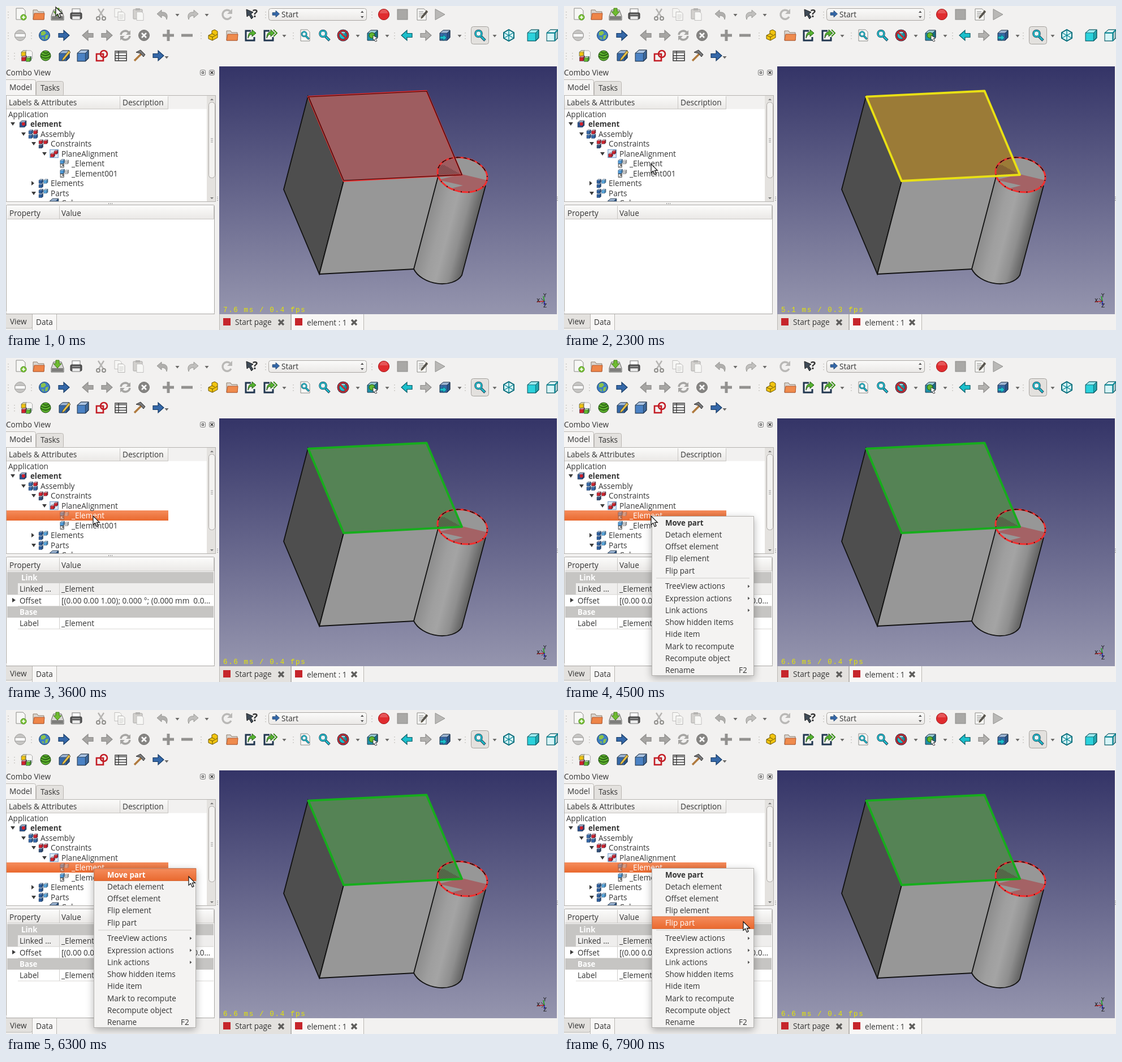
An HTML page that plays this animation: 976 by 574 pixels, repeating every 8000 ms.

```html
<!DOCTYPE html>
<html lang="en">
<head>
<meta charset="utf-8">
<title>Assembly element menu</title>
<style>
html, body { margin: 0; width: 100%; height: 100%; overflow: hidden; background: #f2f1f0; }
svg { display: block; }
text { font: 13.6px "Open Sans", "Noto Sans", sans-serif; fill: #343434; white-space: pre; }
.b { font-weight: 700; font-size: 13.3px; }
.w { fill: #fff; }
.fps { font: 12.5px "Liberation Mono", monospace; letter-spacing: 1.65px; fill: #e6e600; }
.axis { font: 9px "DejaVu Sans", sans-serif; fill: #111; }
#menu { filter: drop-shadow(0 4px 7px rgba(0, 0, 0, .3)); }
</style>
</head>
<body>
<svg id="stage" width="976" height="574" viewBox="0 0 976 574"></svg>
<script>
const TEAL = '#1cbfcb', BLUE = '#3568a8', DARK = '#20364f', GREY = '#a6a5a3', RED = '#d2222c';

// Shape helpers, each returning markup
const path = (d, fill = 'none', stroke = 'none', w = 1, more = '') =>
  `<path d="${d}" fill="${fill}" stroke="${stroke}" stroke-width="${w}" ${more}/>`;
const rect = (x, y, w, h, fill, stroke = 'none', rx = 0, more = '') =>
  `<rect x="${x}" y="${y}" width="${w}" height="${h}" rx="${rx}" fill="${fill}" stroke="${stroke}" ${more}/>`;
const disc = (x, y, r, fill, stroke = 'none', w = 1) =>
  `<circle cx="${x}" cy="${y}" r="${r}" fill="${fill}" stroke="${stroke}" stroke-width="${w}"/>`;
const text = (x, y, s, cls = '', more = '') => `<text x="${x}" y="${y}" class="${cls}" ${more}>${s}</text>`;
const group = (id, body, more = '') => `<g id="${id}" ${more}>${body}</g>`;
const at = (x, y, body, s = 1) => `<g transform="translate(${x} ${y}) scale(${s})">${body}</g>`;
const grad = (id, stops, coords = 'x1="0" y1="0" x2="0" y2="1"') =>
  `<linearGradient id="${id}" ${coords}>` +
  stops.map(([o, c]) => `<stop offset="${o}" stop-color="${c}"/>`).join('') + '</linearGradient>';
const line = (x1, y1, x2, y2, c = '#c3c1be', w = 1) => path(`M${x1} ${y1}L${x2} ${y2}`, 'none', c, w);

// Icons centred on 0,0
const cube = (c, edge = DARK) =>
  path('M-9-4L-3-9H9V4L4 9H-9Z', c, edge) + path('M-9-4L-3-9H9L4-4Z', '#fff8', edge, .7) +
  path('M4-4L9-9V4L4 9Z', '#0003', edge, .7);
const arrow = (c, edge, flip) =>
  path('M-9-3.5H0V-9L10 0 0 9V3.5H-9Z', c, edge, 1.2, flip ? 'transform="scale(-1 1)"' : '');
const drop = (x, y) => path(`M${x - 3.5} ${y - 2}h7l-3.5 4.5z`, '#6b6a68');
const grip = (x, y) => [-5, 0, 5].map(d => rect(x - 1, y + d, 2, 1.4, '#c9c7c4')).join('');
const sheet = (edge = '#8b8b88') => path('M-8-10H4L8-6V10H-8Z', '#f7f7f5', edge);
const folder = (c, edge) => path('M-10 9V-8H-3L-1-5H9V9Z', '#d8d5d0', '#8f7c6b') + path('M-10 9L-8-2H10L9 9Z', c, edge);
const lens = c => path('M2 2L9 9', 'none', DARK, 4.6) + path('M2 2L8.5 8.5', 'none', c, 3) +
  disc(-2.5, -3, 5.5, '#e4f8fa', DARK, 3.6) + disc(-2.5, -3, 5.5, 'none', c, 2.2);
const spin = c => path('M-8-1A8 8 0 0 1 6-5M8 1A8 8 0 0 1-6 5', 'none', c, 3.5) +
  path('M9-9V-1H1ZM-9 9V1H-1Z', c);
const curl = (c, flip) => path('M-10-1L-2-8V-4C7-5 10 1 7 9 6 4 3 2-2 2V6Z', c, '#8f8e8b', .8,
  flip ? 'transform="scale(-1 1)"' : '');
const linkBox = path('M1-8H-8V9H7V3', 'none', DARK, 3) + path('M-4 5C-4-3-1-6 3-6V-10L10-4 3 2V-2C0-2-2 0-4 5Z', '#57b531', '#1f5314');
const pen = path('M-3 5L8-9 11-6 0 7-4 9Z', '#e6c14a', '#4b3c1c', .8);
const bits = (...colors) => colors.map((c, i) => at(i % 2 ? 5 : -5, i < 2 ? -4 : 5, cube(c), .48)).join('');

function toolbars() {
  const icon = [];
  const put = (x, y, body, s) => icon.push(at(x, y, body, s));
  [[4, 15], [459, 15], [647, 15], [4, 52], [45, 52], [345, 52], [508, 52], [687, 52], [812, 52], [4, 88], [15, 88]]
    .forEach(([x, y]) => icon.push(grip(x, y)));
  [[303, 16], [355, 16], [492, 53], [622, 53], [674, 53], [802, 53], [864, 53], [284, 91]]
    .forEach(([x, y]) => icon.push(drop(x, y)));

  put(26, 14, sheet() + disc(5, 6, 5, '#7cc43a', '#4a8d17') + path('M2 6H8M5 3V9', 'none', '#fff', 1.6));
  put(58, 15, folder('#ee8548', '#b9572a'));
  put(91, 15, path('M-11 3L-7-8H7L11 3V10H-11Z', '#d7d6d3', '#636361') + rect(-10, 3, 20, 6, '#7e7e7c') +
    path('M-3-11H3V-5H7L0 3-7-5H-3Z', '#6fbc31', '#3f7d15'));
  put(124, 15, rect(-7, -10, 14, 9, '#fff', '#777') + rect(-10, -3, 20, 11, '#555', '#333', 2) +
    rect(-7, 3, 14, 6, '#eee', '#777') + line(-7, 0, 7, 0, '#ccc'));
  put(168, 15, path('M-5-10L4 4M5-10L-4 4', 'none', '#b5b4b2', 2.4) + disc(-5, 7, 3, 'none', '#8f8e8b', 2) + disc(5, 7, 3, 'none', '#8f8e8b', 2));
  icon.push(group('copy', at(198, 12, sheet('#b2b1af'), .75) + at(204, 18, sheet('#a3a2a0') +
    path('M-5-3H5M-5 0H5M-5 3H5M-5 6H3', 'none', '#c5c4c2'), .75)));
  put(234, 15, rect(-9, -9, 16, 17, '#d3d1ce', '#aaa9a7', 1) + rect(-5, -11, 8, 4, '#b5b4b2') + at(3, 3, sheet('#b2b1af'), .75));
  put(277, 15, curl('#b0afad'));
  put(330, 15, curl('#c0bfbd', 1));
  put(391, 15, path('M7 4A8 8 0 1 1 5-6', 'none', '#b9b8b6', 3.5) + path('M9-10V-1H0Z', '#b9b8b6'));
  put(434, 15, path('M-9-9L3-4-1-1 3 5 0 8-4 1-8 4Z', '#3f4b57', '#222') + text(2, 5, '?', 'b', 'style="font-size:19px"'));

  icon.push(rect(464.5, 4.5, 173, 21, 'url(#button)', '#a9a6a2', 4), at(477, 14, arrow(BLUE, '#153a66'), .65),
    text(487, 19.5, 'Start'), path('M627 12l2.8-3.5 2.8 3.5zM627 18l2.8 3.5 2.8-3.5z', '#555'));
  put(668, 15, disc(0, 0, 9.6, '#e02c2f', '#a5191b') + path('M-7-2A7 7 0 0 1 7-2Z', '#fff3'));
  put(701, 15, rect(-9, -9, 18, 18, '#a9a8a6', '#8b8a88'));
  put(735, 15, sheet() + path('M-5-5H3M-5-2H4M-5 1H3M-5 4H1', 'none', '#888') + at(2, 0, pen.replaceAll('#e6c14a', '#555'), .8));
  put(767, 15, path('M-8-9.5L9 0-8 9.5Z', '#b9b8b6', '#92918f'));

  put(25, 52, disc(0, 0, 9.5, '#c6c5c3', '#a09f9d') + rect(-9, -3, 18, 6, '#fff', '#9b9a98'));
  put(68, 52, disc(0, 0, 9.5, '#3e7fc2', '#183e6d') + path('M-6-6L0-8 3-4-1 0-6 0ZM2 0L7-1 5 6 1 7ZM-5 3L-1 4-2 8Z', '#8bc34a'));
  put(102, 52, arrow(BLUE, '#153a66'));
  put(145, 52, arrow(GREY, '#8d8c8a', 1));
  put(178, 52, arrow(GREY, '#8d8c8a'));
  put(211, 52, spin(GREY));
  put(244, 52, disc(0, 0, 9.5, '#868583', '#737270') + path('M-4-4L4 4M4-4L-4 4', 'none', '#fff', 2.6));
  put(287, 52, path('M-10 0H10M0-10V10', 'none', '#92918f', 5));
  put(320, 52, path('M-10 0H10', 'none', '#92918f', 5));
  put(366, 52, path('M-8 0L-2-3V-8L3-10 8-7V4L-1 9-8 6Z', '#f1c40f', '#6b5500') + path('M-8 0L-1 3 8-2M-1 3V9M-2-3L3-1', 'none', '#6b5500'));
  put(400, 52, folder('#ef8b4d', '#b9572a'));
  put(432, 52, linkBox);
  put(465, 52, linkBox + path('M8-10L14-4 8 2', 'none', '#3c8e1c', 2));
  put(529, 52, sheet() + at(0, 0, lens(TEAL), .75));
  put(563, 52, lens(TEAL));
  put(596, 52, at(0, 0, cube(TEAL), .8) + disc(0, 0, 8.5, 'none', '#20364f', 4) + disc(0, 0, 8.5, 'none', '#c22b31', 2.5) +
    path('M-6-6L6 6', 'none', '#c22b31', 3));
  put(648, 52, cube('#1e92a8') + disc(-1, 0, 5, '#62b82f', '#24560f') + path('M1 0L9 5 5 6 8 10 5 11 3 7 1 9Z', '#fff', '#222', .8));
  put(709, 52, arrow(TEAL, '#075b66', 1));
  put(742, 52, arrow('#b2b1af', '#8d8c8a'));
  put(776, 52, cube(BLUE) + at(-3, 4, arrow(TEAL, '#075b66'), .6));
  icon.push(rect(822.5, 36.5, 31, 31, '#e3e1de', '#a5a29e', 4));
  put(838, 52, lens(TEAL));
  put(889, 52, path('M-9-5L0-10 9-5V5L0 10-9 5Z', '#d7f4f7', '#0b6b78', 2) +
    path('M-9-5L0 0 9-5M0 0V10M-9 5L0 0 9 5M0-10V0', 'none', '#0b8795', 1.4));
  put(932, 52, cube('#2bd2dc', '#075b66'), 1.1);
  put(966, 52, cube('#d7f4f7', '#075b66') + path('M-9-4H4V9M4-4L9-9', 'none', '#0b8795', 2), 1.1);

  put(36, 88, at(-4, -4, cube('#f1c40f'), .55) + at(5, -2, sheet(), .7) + at(-4, 5, cube(RED), .5) + at(4, 6, cube('#62b82f'), .5));
  put(70, 88, disc(0, 0, 9, '#5cae2d', '#1e4f0e') + path('M-8-3Q0 3 8-4M-9 1Q0 8 9 1M-5-7Q1-2 6-7', 'none', '#1e4f0e', 1.4));
  put(103, 88, cube(BLUE) + pen);
  put(136, 88, cube('#4b82c4'), 1.1);
  put(169, 88, rect(-9, -3, 12, 12, 'none', '#c31d25', 0, 'stroke-width="2.6"') + disc(4, -3, 6, 'none', '#c31d25', 2.6));
  put(203, 88, rect(-10, -8, 20, 17, '#fff', '#333', 0, 'stroke-width="1.5"') + rect(-10, -8, 20, 4, '#888') +
    path('M-10 0H10M-10 4.5H10M-4-8V9', 'none', '#333', 1.3));
  put(236, 88, path('M-9 9L4-4', 'none', '#b07a3e', 3.5) + path('M-6-6L2-10 10-2 7 2 2-4Z', '#77787a', '#333'));
  put(269, 88, arrow(BLUE, '#153a66'));
  return icon.join('');
}

const rowY = i => 196.5 + 17.5 * i;
function panel() {
  const fold = (x, y, open) => path(open ? `M${x - 4} ${y - 3}h8l-4 6z` : `M${x - 3} ${y - 4}v8l5-4z`, '#3c3c3c');
  const row = (i, x, label, icon, cls) => at(x - 13, rowY(i) - 5, icon, .85) + text(x, rowY(i), label, cls);
  const pair = bits('#2d5f9e', '#58a6dc', '#2d5f9e');
  const link = at(-4, -4, cube('#4f9bd9'), .5) + at(5, -3, cube('#c4c6c8', '#666'), .45) +
    rect(-8, 1, 7, 7, '#fff', '#222') + path('M-6 7L-2 3M-5 3H-2V6', 'none', '#222');
  return text(0, 123, 'Combo View') +
    rect(343.5, 113.5, 9, 9, 'none', '#777', 2) + rect(346.5, 116.5, 3, 3, 'none', '#444') +
    rect(359.5, 113.5, 9, 9, 'none', '#777', 2) + path('M361.5 115.5l5 5m0-5l-5 5', 'none', '#333', 1.5) +
    rect(53.5, 133.5, 48, 26, '#e3e1de', '#bab7b3', 3) + text(61, 149.5, 'Tasks') +
    rect(-3.5, 130.5, 56, 30, '#f6f5f4', '#bab7b3', 3) + text(6, 148.5, 'Model') +
    rect(.5, 158.5, 370, 188, '#fff', '#b5b3b0') +
    rect(1, 159, 354, 23.5, '#f2f1f0') + rect(1, 159, 286, 23.5, 'url(#button)') +
    path('M1 182.5H286.5V160M201.5 160V182', 'none', '#c8c6c3') +
    text(5, 176, 'Labels &amp; Attributes') + text(206, 176, 'Description') +
    rect(355, 159, 15, 187, '#e4e2df') + rect(358.5, 170.5, 11, 134, '#f3f2f0', '#aaa7a3', 5) +
    path('M362 235h4m-4 3h4m-4 3h4', 'none', '#999') +
    path('M361 167l3-3 3 3zM361 339l3 3 3-3z', '#777') +
    group('picked', rect(1, 270, 286, 18, 'url(#hot)')) +
    text(4, rowY(0), 'Application') +
    row(1, 43, 'element', at(0, 0, cube('#2b4f8c'), .75) + disc(1, 0, 3.5, RED), 'b') +
    row(2, 61, 'Assembly', bits(BLUE, RED, BLUE, BLUE)) +
    row(3, 79, 'Constraints', bits(RED, RED, '#33507a')) +
    row(4, 98, 'PlaneAlignment', rect(-8.5, -8.5, 17, 17, '#dce9f6', '#5a8ac0') + at(-3, 3, cube(RED), .5) + at(4, -3, cube(RED), .45)) +
    row(5, 116, '_Element', link).replace('<text', '<text id="label"') + row(6, 116, '_Element001', link) +
    group('tint', rect(94, 271, 18, 17, '#ee7744', 'none', 0, 'opacity=".5"')) +
    row(7, 79, 'Elements', pair) + row(8, 79, 'Parts', pair) +
    `<g clip-path="url(#tree)">${row(9, 98, 'Cube', cube(BLUE))}</g>` +
    fold(12, 209, 1) + fold(31, 227, 1) + fold(49, 244, 1) + fold(68, 262, 1) + fold(48, 314, 0) + fold(49, 332, 1) +
    path('M181 350h1m2 0h1m2 0h1', 'none', '#888', 2) + path('M374 338v1m0 2v1m0 2v1M975 338v1m0 2v1m0 2v1', 'none', '#999', 2) +
    rect(.5, 352.5, 368, 193, '#fff', '#a9a7a4', 2) +
    rect(2, 354, 365, 23.5, 'url(#button)') + path('M2 377.5H367.5V354M94.5 354V377', 'none', '#c8c6c3') +
    text(6, 372, 'Property') + text(98, 372, 'Value') + group('props', properties()) +
    rect(-3.5, 540, 50, 31, '#e3e1de', '#bab7b3', 3) + text(7, 564, 'View') +
    rect(46.5, 540, 43, 38, '#f8f7f6', '#bab7b3', 3) + text(53, 565, 'Data') +
    rect(1.5, 536, 366, 9, '#fff') + line(0, 545.5, 369, 545.5, '#a9a7a4');
}

function properties() {
  const band = (y, s, x) => rect(2, y, 365, 20, '#c6c5c3') + text(x, y + 15, s, 'b w');
  const cell = (y, a, b) => line(21, y + 20, 367, y + 20, '#d9d7d4') + line(94.5, y, 94.5, y + 20, '#d0cecb') +
    text(24, y + 15, a) + text(98, y + 15, b);
  return band(379, 'Link', 27) + rect(2, 399, 19, 20.5, '#c6c5c3') + rect(21, 399, 346, 20.5, '#efeeed') +
    cell(399, 'Linked …', '_Element') +
    cell(419.5, 'Offset', '[(0.00 0.00 1.00); 0.000 °; (0.000 mm  0.0…') + path('M11 425v8l6-4z', '#3c3c3c') +
    band(440, 'Base', 24) + cell(460, 'Label', '_Element');
}

const CAP = 'cx="807" cy="299" rx="44.5" ry="30" transform="rotate(12 807 299)"';
function view() {
  const top = 'M534.5 160.7L743.5 150.5 806 299 597 310Z';
  const side = 'M764 302L721 466A46 31 12 0 0 806 477L848 318';
  const rim = (fill, stroke, w, more = '') => `<ellipse ${CAP} fill="${fill}" stroke="${stroke}" stroke-width="${w}" ${more}/>`;
  const tab = (x, w, y, fill, label) => rect(x + .5, y, w, 40, fill, '#bab7b3', 3) + rect(x + 7, 553, 13, 13, '#c6252b') +
    text(x + 28, y + 24.5, label) + path(`M${x + w - 21} 556l9 9m0-9l-9 9`, 'none', '#5f5e5c', 3.4);
  return tab(377, 126, 540, '#e3e1de', 'Start page') + tab(504, 128, 541, '#f8f7f6', 'element : 1') +
    rect(377, 107, 597, 439, 'url(#sky)') +
    path('M534 160L597 310 554 475 491 325Z', '#4e4e4e', '#111', 1.8) +
    path('M597 310L806 299 764 466 722 466 554 475Z', '#979797') + path('M554 475L722 466M597 310L554 475', 'none', '#111', 1.8) +
    path(side + 'Z', 'url(#tube)') + path(side, 'none', '#111', 1.8) +
    path(top, '#9e5d60', 'none', 0, 'id="face"') + rim('#979797', 'none', 0) +
    `<g clip-path="url(#cap)">${path('M806 298L860 311 835 335 780 325 808 318 764 308Z', '#a46265')}` +
    path('M758 260L790 260 806 299 758 302Z', '#9e5d60', 'none', 0, 'id="corner"') +
    path('M760 281L775 282 806 299 760 301Z', 'url(#mesh)') + '</g>' +
    rim('none', '#f12f2f', 3) +
    rim('none', '#111', 1.4, 'pathLength="100" stroke-dasharray="0 51 3 2 4 2 3 2 4 2 3 2 4 2 3 2 4 7"') +
    rim('none', '#111', 2, 'pathLength="100" stroke-dasharray=".7 5"') +
    path(top, 'none', '#f02b2b', 2.8, 'id="edge" stroke-linejoin="round"') +
    group('inner', path('M535 161L744 151 806 299 597 309Z', 'none', '#111', 1.2)) +
    text(384, 542, '', 'fps', 'id="fps"') +
    line(952, 523, 939, 524, '#c81e1e', 1.6) + line(952, 523, 950, 514, '#20a020', 1.6) + line(952, 523, 952, 530, '#2222c0', 1.6) +
    path('M952 523l-6-5M952 523l-5 4', 'none', '#333') +
    text(938, 525, 'X', 'axis') + text(950, 516, 'Y', 'axis') + text(950, 534, 'Z', 'axis');
}

const items = ['Move part', 'Detach element', 'Offset element', 'Flip element', 'Flip part', 'TreeView actions',
  'Expression actions', 'Link actions', 'Show hidden items', 'Hide item', 'Mark to recompute', 'Recompute object', 'Rename'];
const PITCH = 21.25;
const itemY = i => 281 + PITCH * i + (i > 4 ? 6.5 : 0);
const menu = () => rect(155.5, 280.5, 180, 282, '#f4f3f2', '#b4b2af') + line(163, 390, 328, 390, '#cfcdca') +
  rect(156, 281, 180, 21.5, 'url(#hot)', '#cf5a26', 0, 'id="hover" stroke-width=".8"') +
  items.map((s, i) => text(179, itemY(i) + 15.5, s, i ? 'item' : 'item b') +
    (i > 4 && i < 8 ? path(`M325 ${itemY(i) + 8}l3.5 2.7-3.5 2.7z`, '#555') : '')).join('') + text(309, 557.5, 'F2');

const defs = '<defs>' + grad('sky', [[0, '#343467'], [1, '#9595ae']]) + grad('button', [[0, '#fbfbfa'], [1, '#eae8e6']]) +
  grad('hot', [[0, '#f58c5c'], [1, '#e9692f']]) +
  grad('tube', [[0, '#8c8c8c'], [.3, '#9f9f9f'], [.5, '#a4a4a4'], [.75, '#8f8f8f'], [1, '#606060']],
    'gradientUnits="userSpaceOnUse" x1="742" y1="384" x2="825" y2="406"') +
  '<pattern id="mesh" width="3" height="3" patternUnits="userSpaceOnUse"><path d="M0 0H1.5V1.5H0ZM1.5 1.5H3V3H1.5Z" fill="#54282a99"/></pattern>' +
  '<clipPath id="tree"><path d="M0 159H355V346H0Z"/></clipPath>' +
  `<clipPath id="cap"><ellipse ${CAP}/></clipPath></defs>`;

const stage = document.getElementById('stage');
stage.innerHTML = defs + toolbars() + panel() + view() + group('menu', menu()) +
  group('pointer', path('M0 0V15.5L3.6 12.2 6.3 18.7 9 17.4 6.4 11.3H11.3Z', '#fff', '#111', 1.2));

const el = id => document.getElementById(id);
const set = (id, attrs) => { for (const k in attrs) el(id).setAttribute(k, attrs[k]); };
const show = (id, on) => set(id, { visibility: on ? 'visible' : 'hidden' });
const labels = [...document.querySelectorAll('.item')];

// Pointer stops: time, x, y
const track = [[0, 88, 2], [300, 358, 304], [800, 358, 304], [1600, 179, 288], [1700, 163, 284], [1800, 161, 282],
  [2000, 161, 282], [2200, 154, 280], [5400, 154, 280], [5800, 355, 322], [6000, 355, 322], [6300, 323, 295],
  [6500, 333, 312], [6800, 333, 312], [7000, 333, 346], [7200, 333, 346], [7500, 332, 351], [7700, 332, 351], [7900, 317, 375]];
function pointer(t) {
  const n = track.findIndex(k => k[0] > t);
  if (n < 0) return track.at(-1).slice(1);
  const [a, b] = [track[n - 1], track[n]], f = (t - a[0]) / (b[0] - a[0]);
  return [1, 2].map(i => Math.round(a[i] + (b[i] - a[i]) * f));
}

const looks = [
  { face: '#9e5d60', edge: '#f02b2b', width: 2.8, fps: '7.6 ms / 0.4 fps' },
  { face: '#9b7b37', edge: '#e9e014', width: 3.8, fps: '5.1 ms / 0.3 fps' },
  { face: '#558355', edge: '#16ad1c', width: 3.8, fps: '6.6 ms / 0.4 fps' }
];

function draw() {
  const t = Math.floor(performance.now() % 8000 / 100) * 100;
  const [x, y] = pointer(t);
  const picked = t >= 3200, look = looks[picked ? 2 : t >= 2300 ? 1 : 0];
  set('pointer', { transform: `translate(${x} ${y})` });
  set('face', { fill: look.face });
  set('corner', { fill: look.face });
  set('edge', { stroke: look.edge, 'stroke-width': look.width });
  el('fps').textContent = look.fps;
  show('inner', t < 2300);
  show('picked', picked);
  show('tint', picked);
  el('label').style.fill = picked ? '#fff' : '';
  show('props', t >= 3300);
  set('copy', { opacity: t >= 3600 ? 1 : .85 });
  set('menu', { opacity: t < 4400 ? 0 : t < 4500 ? .5 : 1 });

  const inside = t >= 5500 && x > 155 && x < 336;
  const hot = inside ? Math.floor((y - 281) / PITCH) : -1;
  set('hover', { y: itemY(hot), opacity: inside ? 1 : 0 });
  labels.forEach((n, i) => n.classList.toggle('w', i === hot));
  requestAnimationFrame(draw);
}
draw();
</script>
</body>
</html>
```
